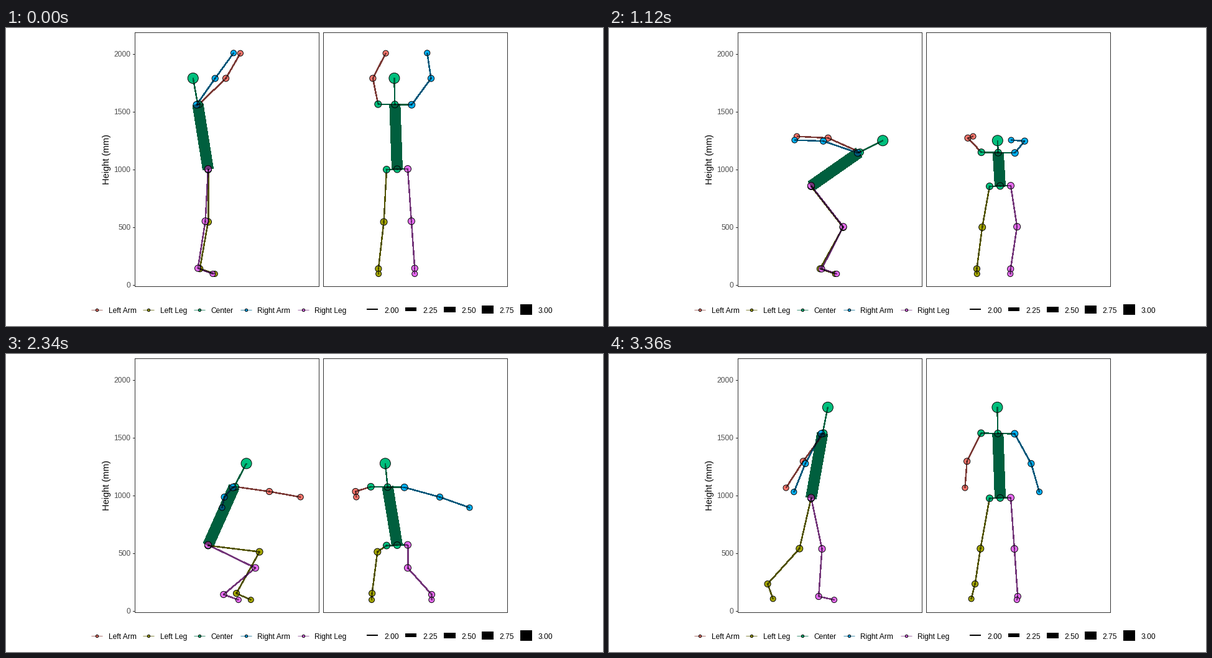
Write a matplotlib script that moves like this. It is 960 px wide and 480 px high and loops after 3.38 s.

```python
import numpy as np
import matplotlib.pyplot as plt
from matplotlib.animation import FuncAnimation
from matplotlib.collections import LineCollection

W, H, DPI = 960, 480, 100
STEP, FRAMES = 20, 169
PT = 72 / DPI  # points per pixel

plt.rcParams["font.family"] = "Liberation Sans"

COLORS = {
    "Left Arm": "#F8766D",
    "Left Leg": "#A3A500",
    "Center": "#00BF7D",
    "Right Arm": "#00B0F6",
    "Right Leg": "#E76BF3",
}

# ---------------------------------------------------------------- motion
# Reach up, crouch, leap, land in a lunge, rise and step off.
CLOCK = np.arange(FRAMES) * STEP / 1000


def path(points):
    """Smooth Hermite curve through {seconds: value}, held after the last."""
    times = np.array(list(points))
    values = np.array(list(points.values()), float)
    slope = np.gradient(values, times)
    t = np.clip(CLOCK, times[0], times[-1])
    i = np.clip(np.searchsorted(times, t, side="right") - 1, 0, len(times) - 2)
    span = times[i + 1] - times[i]
    u = (t - times[i]) / span
    ease = u * u * (3 - 2 * u)
    return (values[i] + (values[i + 1] - values[i]) * ease
            + span * u * (1 - u) * ((1 - u) * slope[i] - u * slope[i + 1]))


def limb(length, swing, out):
    """Vector (side, front, down); swing 0 hangs, 90 points ahead."""
    swing, out = np.radians(swing), np.radians(out)
    return np.stack([length * np.cos(out) * np.sin(swing),
                     length * np.sin(out) + 0 * swing,
                     length * np.cos(out) * np.cos(swing)], axis=1)


lunge = np.exp(-((CLOCK - 2.34) / 0.35) ** 2)

lean = path({0: -9, 0.48: -11, 1.12: 55, 1.6: 19, 2.34: 24, 3.02: 26, 3.36: 10})
sway = -2 - 6.5 * lunge
spine = limb(106 - 0.004 * lean**2, 180 - lean, sway)
skull = limb(43, 180 - 1.15 * lean, 0.6 * sway)

# Arms: swing, extra swing at the elbow, spread, inward turn of the forearm.
l_arm = (path({0: 134, 0.48: 141, 1.12: -114, 1.6: 112, 2.34: 82, 3.02: 28, 3.36: -36}),
         path({0: 16, 1.12: 21, 1.6: 5, 3.36: 3}),
         path({0: 8, 0.48: 10, 0.8: 35, 1.12: 21, 1.6: 10, 2.34: 24, 3.36: 22}),
         32 - 1.2 * CLOCK**2)
r_arm = (path({0: 145, 0.48: 149, 1.12: -109, 1.6: 113, 2.34: -41, 3.02: -44, 3.36: -28}),
         path({0: -1, 1.12: 17, 1.6: 9, 2.34: 29, 3.36: 6}),
         path({0: 31, 0.48: 29, 0.8: 40, 1.12: 15, 1.6: 14, 2.34: 70, 3.02: 25, 3.36: 26}),
         path({0: 38, 1.6: 32, 2.34: 0, 3.02: 14, 3.36: 11}))

# Legs: swing of thigh and shank, spread of thigh and shank.
l_leg = (path({0: 0, 0.48: -2, 1.12: 38, 1.6: 1, 2.34: 83, 3.02: 18, 3.36: -13}),
         path({0: -10, 0.48: -17, 1.12: -29, 1.6: -51, 2.34: -29, 3.02: -26, 3.36: -42}),
         np.minimum(10, 3 + 4.5 * CLOCK),
         6.5)
r_leg = (path({0: -3, 0.48: -5, 1.12: 38, 1.6: -6, 2.34: 64, 3.02: 9, 3.36: 12}),
         path({0: -9, 0.48: -13, 1.12: -27, 1.6: -47, 2.34: -50, 3.02: -36, 3.36: -4}),
         path({0: 4, 1.6: 6, 2.34: 0, 3.02: 18, 3.36: 4}),
         path({0: 4, 1.6: -2, 2.34: 30, 3.02: 1, 3.36: 4}))
hip_y = path({0: 227.5, 0.48: 229.5, 1.12: 254.5, 1.6: 233, 2.34: 308, 3.02: 237, 3.36: 232})


def arm_bones(sign, swing, bend, out, turn):
    return limb(60.5, swing, sign * out), limb(51, swing + bend, sign * (out - turn))


def leg_bones(sign, thigh, shank, thigh_out, shank_out):
    return limb(84.5, thigh, sign * thigh_out), limb(77, shank, sign * shank_out)


def foot(sign, ankle):
    """The toe reaches for the floor and hangs when the heel is high."""
    drop = np.clip(396 - ankle[:, 2], 5, 24)
    return np.stack([np.sqrt(25.5**2 - drop**2), sign * 0.4 * (drop - 9), drop], axis=1)


l_leg, r_leg = leg_bones(-1, *l_leg), leg_bones(1, *r_leg)

# No ankle may sink below its standing height.
hip_y = np.minimum(hip_y, 391 - np.maximum(sum(l_leg), sum(r_leg))[:, 2])

# Joints hold (side x, front x, y) for every frame.
pelvis = np.stack([0 * hip_y + 325, 0 * hip_y + 629, hip_y], axis=1)
neck = pelvis + spine
J = {"pelvis": pelvis, "neck": neck, "head": neck + skull}

for side, sign, arm, leg in (("l_", -1, l_arm, l_leg), ("r_", 1, r_arm, r_leg)):
    upper, fore = arm_bones(sign, *arm)
    J[side + "shoulder"] = neck + sign * np.array([-2, 27, 0.5])
    J[side + "elbow"] = J[side + "shoulder"] + upper
    J[side + "hand"] = J[side + "elbow"] + fore
    J[side + "hip"] = pelvis + sign * np.array([0, 17, -0.5])
    J[side + "knee"] = J[side + "hip"] + leg[0]
    J[side + "ankle"] = J[side + "knee"] + leg[1]
    J[side + "toe"] = J[side + "ankle"] + foot(sign, J[side + "ankle"])

# ---------------------------------------------------------------- body plan
RADIUS = {"head": 8.5, "hand": 4.6, "elbow": 5.1, "ankle": 5.1, "toe": 4.5}
ARM = ["shoulder", "elbow", "hand"]
LEG = ["hip", "knee", "ankle", "toe"]

POINTS = [(n, "Center") for n in ("head", "neck", "l_shoulder", "pelvis", "l_hip")]
POINTS += [("l_" + n, "Left Arm") for n in ARM[1:]]
POINTS += [("l_" + n, "Left Leg") for n in LEG[1:]]
POINTS += [("r_" + n, "Right Arm") for n in ARM]
POINTS += [("r_" + n, "Right Leg") for n in LEG]

BONES = [("neck", "pelvis", "Center"), ("head", "neck", "Center"),
         ("l_shoulder", "neck", "Center"), ("neck", "r_shoulder", "Center"),
         ("l_hip", "pelvis", "Center"), ("pelvis", "r_hip", "Center")]
for side, word in (("l_", "Left"), ("r_", "Right")):
    for part, names in (("Arm", ARM), ("Leg", LEG)):
        BONES += [(side + a, side + b, f"{word} {part}")
                  for a, b in zip(names, names[1:])]

POINT_COLORS = [COLORS[g] for _, g in POINTS]
POINT_RADII = [RADIUS.get(n.split("_")[-1], 5.5) for n, _ in POINTS]
BONE_COLORS = [COLORS[g] for *_, g in BONES]
BONE_WIDTHS = [17] + [1.45] * (len(BONES) - 1)

# ---------------------------------------------------------------- stage
fig = plt.figure(figsize=(W / DPI, H / DPI), dpi=DPI, facecolor="white")
ax = fig.add_axes([0, 0, 1, 1])
ax.set_xlim(0, W)
ax.set_ylim(H, 0)
ax.axis("off")


def rule(xs, ys, width=1, color="#333333"):
    ax.plot(xs, ys, color=color, lw=width * PT, antialiased=False,
            solid_capstyle="butt", solid_joinstyle="miter")


def label(x, y, text, size=12, **kw):
    ax.text(x, y, text, fontsize=size * PT, **kw)


def lines(segs, colors, widths, z, alpha=None, smooth=False):
    item = LineCollection(segs, colors=colors, alpha=alpha, zorder=z,
                          linewidths=np.array(widths) * PT, antialiaseds=smooth)
    return ax.add_collection(item)


def figure_layer(segs, colors, widths, dots, fills, radii, smooth=False):
    """Coloured lines, dots on them, then half-black lines over both."""
    under = lines(segs, colors, widths, 2, smooth=smooth)
    marks = ax.scatter(*np.transpose(dots), s=(2 * np.array(radii) * PT) ** 2,
                       c=fills, edgecolors="black", linewidths=0.95 * PT, zorder=3)
    over = lines(segs, "black", widths, 4, 0.5, smooth)
    return under, marks, over


for left in (207, 510):
    right = left + 296
    rule([left, right, right, left, left], [7, 7, 416, 416, 7])

for value in range(0, 2001, 500):
    y = 413.6 - value * 0.186
    rule([204, 207], [y, y])
    label(200.5, y + 4.8, str(value), color="#4D4D4D", ha="right", va="baseline")
label(169, 211, "Height (mm)", 14.67, rotation=90, ha="right", va="center")

for x, (name, color) in zip((146, 229, 310.5, 385.5, 477.5), COLORS.items()):
    figure_layer([[(x - 9, 453.5), (x + 9, 453.5)]], [color], [0.6],
                 [(x, 453.5)], [color], [2.2], smooth=True)
    label(x + 19, 459, name, va="baseline")

for i, thick in enumerate((2, 6, 9, 13, 17)):
    x = 580 + 61.75 * i
    rule([x, x + 18], [453.4, 453.4], thick, "black")
    label(x + 28.5, 459, f"{2 + i / 4:.2f}", va="baseline")


def pose(n, view):
    """Bone segments and joint dots for one frame; view 0 side, 1 front."""
    at = {name: (p[n, view], p[n, 2]) for name, p in J.items()}
    return [[at[a], at[b]] for a, b, _ in BONES], [at[k] for k, _ in POINTS]


views = []
for view in (0, 1):
    segs, dots = pose(0, view)
    views.append(figure_layer(segs, BONE_COLORS, BONE_WIDTHS,
                              dots, POINT_COLORS, POINT_RADII))


def draw(n):
    for view, (under, marks, over) in enumerate(views):
        segs, dots = pose(n, view)
        under.set_segments(segs)
        over.set_segments(segs)
        marks.set_offsets(dots)
    return [item for layer in views for item in layer]


anim = FuncAnimation(fig, draw, frames=FRAMES, interval=STEP,
                     repeat=True, repeat_delay=0, blit=False)
plt.show()
```
